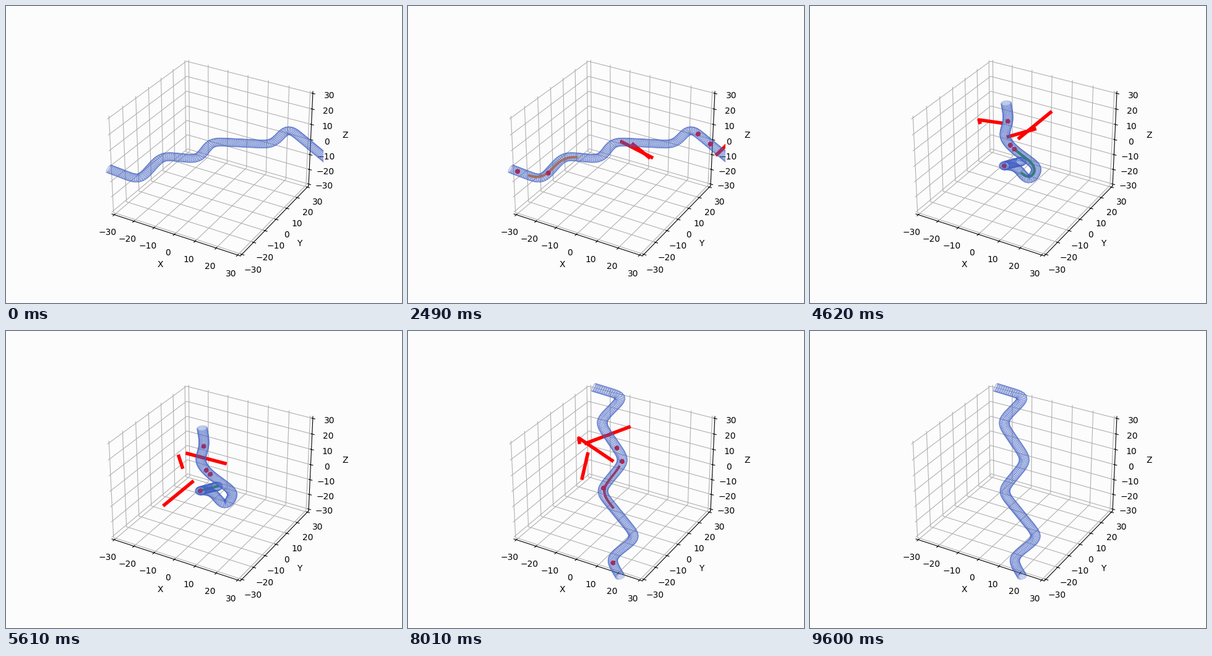
Recreate the animation shown at these times as a matplotlib script. Size 640x480 px, loop 9.63 s.

```python
import numpy as np
import matplotlib.pyplot as plt
from matplotlib.animation import FuncAnimation

FRAMES, STEP = 321, 30
TRAIL = 20
RADIUS = 2.15
BEND = 24            # how far, in pixels, a corner of a tube is rounded
PAPER = "#fcfcfc"

# camera axes (elev 30, azim -60): right, up, towards the viewer
RIGHT = np.array([0.8660, 0.5, 0])
UP = np.array([-0.25, 0.4330, 0.8660])
NEAR = np.array([0.4330, -0.75, 0.5])
UNIT = np.array([0.0190476, 0.0190476, 0.0142857])
ZOOM = 1997.84
MID = np.array([333, 237.4])


def to_data(pts):
    """Stage points (x, y, depth in pixels) to data coordinates."""
    x, y, d = pts.T
    depth = d * 10 / ZOOM
    a = (x - MID[0]) / ZOOM * (10 - depth)
    b = (MID[1] - y) / ZOOM * (10 - depth)
    world = np.outer(a, RIGHT) + np.outer(b, UP) + np.outer(depth, NEAR)
    return world / UNIT


def resample(pts, n=None):
    """Even spacing along a polyline, one pixel apart if n is not given."""
    seg = np.linalg.norm(np.diff(pts, axis=0), axis=1)
    s = np.r_[0, np.cumsum(seg)]
    t = np.linspace(0, s[-1], n or int(s[-1]))
    return np.stack([np.interp(t, s, c) for c in pts.T], axis=1)


def smooth(pts, width):
    """Moving average run twice, ends continued in a straight line."""
    box = np.ones(width) / width
    k = np.arange(width, 0, -1)[:, None]
    head = pts[0] - k * (pts[1] - pts[0])
    tail = pts[-1] + k[::-1] * (pts[-1] - pts[-2])
    full = np.vstack([head, pts, tail])
    cols = [np.convolve(np.convolve(c, box, "valid"), box, "valid")
            for c in full.T]
    return np.stack(cols, axis=1)[1:-1]


def centre_line(corners, lean, pull):
    """Rounded polyline; depth leans with x and y, pull bends its far end."""
    flat = smooth(resample(np.array(corners, float)), BEND)
    t = np.linspace(0, 1, len(flat))
    depth = (flat - MID) @ lean + pull * t ** 10
    return np.column_stack([flat, depth])


def tube(path, rings=150, sides=20):
    c = resample(path, rings)
    t = np.gradient(c, axis=0)
    t /= np.linalg.norm(t, axis=1)[:, None]
    phi = np.linspace(0, 2 * np.pi, sides + 1)
    n = np.cross(t[0], [0.3, -0.5, 0.8])
    skin = []
    for p, d in zip(c, t):
        n = n - d * (n @ d)
        n /= np.linalg.norm(n)
        b = np.cross(d, n)
        skin.append(p + RADIUS * (np.outer(np.cos(phi), n)
                                  + np.outer(np.sin(phi), b)))
    return np.array(skin).transpose(2, 0, 1)


def flight(turns, count):
    """Straight flights at steady speed between turns (step, x, y)."""
    k, x, y = np.array(turns, float).T
    i = np.arange(count)
    return to_data(np.column_stack([np.interp(i, k, x), np.interp(i, k, y), 0 * i]))


def stuck(spot, count):
    a = 2.4 * np.arange(count)
    return to_data(spot + 0.8 * np.column_stack([np.cos(a), np.sin(a), 0 * a]))


SCENES = [
    dict(
        start=0, steps=90, color="C1", lean=(-0.23, 0), pull=0,
        corners=[(530, 257), (456, 196), (431, 224), (331, 219),
                 (312, 248), (252, 242), (216, 282), (166, 263)],
        stuck_at=(0.13, 0.19, 0.84, 0.97),
        flights=[[(0, 343, 290), (20, 377, 357), (90, 576, 166)],
                 [(0, 379, 277), (20, 306, 177), (90, 400, 253)],
                 [(0, 293, 284), (55, 325, 209), (90, 414, 255)]],
    ),
    dict(
        start=111, steps=74, color="C2", lean=(0, -0.577), pull=100,
        corners=[(317, 157), (322, 186), (311, 210), (326, 229), (371, 262),
                 (354, 286), (331, 256), (306, 260), (342, 251)],
        stuck_at=(0.11, 0.26, 0.29, 0.72),
        flights=[[(0, 269, 226), (42, 363, 199), (56, 354, 214), (73, 293, 198)],
                 [(0, 415, 237), (18, 402, 161), (73, 256, 281)],
                 [(0, 323, 275), (20, 316, 190), (38, 273, 184), (73, 285, 220)]],
    ),
    dict(
        start=206, steps=94, color="C3", lean=(0, -0.577), pull=0,
        corners=[(300, 91), (349, 106), (309, 147), (351, 209),
                 (310, 259), (370, 333), (326, 368), (343, 397)],
        stuck_at=(0.36, 0.42, 0.555, 0.935),
        flights=[[(0, 330, 240), (34, 262, 191), (93, 478, 110)],
                 [(0, 460, 297), (58, 276, 173), (93, 293, 295)],
                 [(0, 262, 322), (93, 306, 131)]],
    ),
]

fig = plt.figure(figsize=(6.4, 4.8), dpi=100, facecolor=PAPER)
ax = fig.add_subplot(projection="3d", facecolor=PAPER)
ax.set(xlim=(-31.25, 31.25), ylim=(-31.25, 31.25), zlim=(-31.25, 31.25),
       xlabel="X", ylabel="Y", zlabel="Z")
for axis in (ax.xaxis, ax.yaxis, ax.zaxis):
    axis.set_pane_color(PAPER)

for sc in SCENES:
    n = sc["steps"]
    line = resample(centre_line(sc["corners"], sc["lean"], sc["pull"]))
    sc["mesh"] = ax.plot_wireframe(*tube(to_data(line)), rstride=1, cstride=1,
                                   color="#4060c4", alpha=0.5, linewidth=0.5)
    core = resample(smooth(line, BEND), n)
    spots = [line[int(f * len(line))] for f in sc["stuck_at"]]
    paths = [to_data(core)]
    paths += [stuck(s, n) for s in spots]
    paths += [flight(f, n) for f in sc["flights"]]
    sc["paths"] = [p.T for p in paths]

core_line, = ax.plot([], [], [], lw=3)
red_lines = [ax.plot([], [], [], color="red", lw=4)[0] for _ in range(7)]


def draw(frame):
    now = [sc for sc in SCENES if sc["start"] <= frame][-1]
    for sc in SCENES:
        sc["mesh"].set_visible(sc is now)
    core_line.set_color(now["color"])
    i = frame - now["start"]
    for line, path in zip([core_line] + red_lines, now["paths"]):
        line.set_data_3d(*path[:, max(0, i - TRAIL):i])
    return [core_line] + red_lines


anim = FuncAnimation(fig, draw, frames=FRAMES, interval=STEP, repeat=True,
                     repeat_delay=0, blit=False)
plt.show()
```
